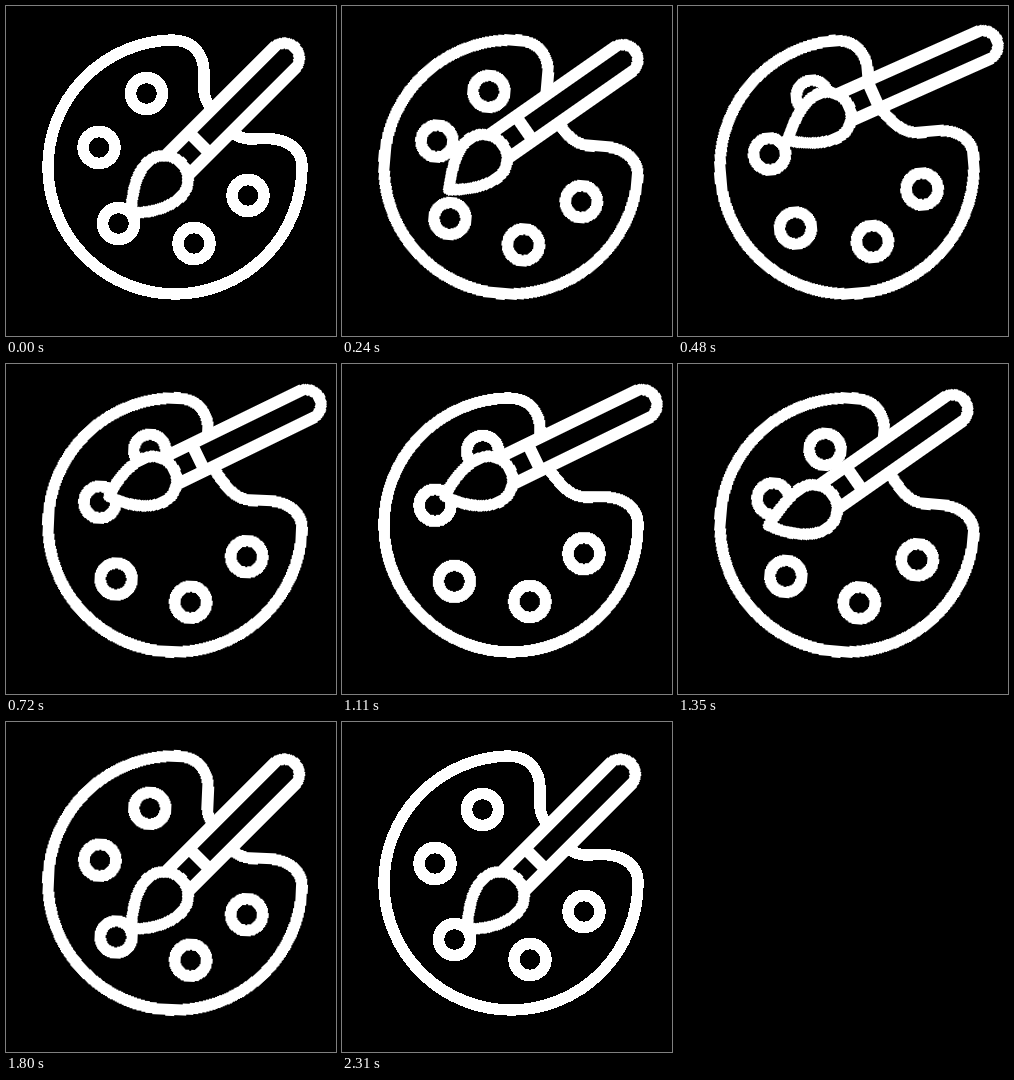
An HTML page without scripts for the animation above (2.46 s loop, 330x330 px).

```html
<!DOCTYPE html>
<html lang="en">
<head>
<meta charset="utf-8">
<title>Palette and brush</title>
<style>
  html, body { margin: 0; width: 100%; height: 100%; overflow: hidden; background: #000; }
  svg { display: block; width: 100vw; height: 100vh; }
  .line { fill: #000; stroke: #fff; stroke-width: 11.5; stroke-linejoin: round; shape-rendering: crispEdges; }

  .palette, .brush, .bristles { animation: 2460ms linear infinite; }
  .palette { transform-origin: 168.5px 161.5px; animation-name: rock; animation-timing-function: ease-in-out; }
  .brush { animation-name: sweep; }
  .bristles { animation-name: bend; animation-timing-function: ease-in-out; }

  @keyframes rock {
    0%, 43.902%, 87.805%, 100% { transform: rotate(0deg); }
    10.976%, 32.927%, 54.878%, 76.829% { transform: rotate(5deg); }
    21.951%, 65.854% { transform: rotate(-6deg); }
  }

  /* Lift off one paint well, cross over, dip into the next, then return */
  @keyframes sweep {
    0%, 65.854%, 100% { transform: translate(156px, 174.5px) rotate(-45deg); }
    2.439% { transform: translate(149px, 167px) rotate(-42.5deg); }
    9.756% { transform: translate(139px, 153px) rotate(-35deg); }
    19.512% { transform: translate(147px, 110px) rotate(-24deg); }
    21.951%, 45.122% { transform: translate(144.5px, 116.5px) rotate(-26deg); }
    46.341% { transform: translate(144px, 113px) rotate(-25.5deg); }
    54.878% { transform: translate(133px, 145px) rotate(-35deg); }
    63.415% { transform: translate(147px, 165px) rotate(-42deg); }
  }

  /* The tip trails behind the handle */
  @keyframes bend {
    0%, 68.293%, 100% { d: path("M26 1C26 14 16 25 2 25C-17 25 -36 11 -44 1C-36 -7 -17 -23 2 -23C16 -23 26 -12 26 1Z"); }
    9.756%, 19.512% { d: path("M26 1C26 14 16 25 2 25C-17 25 -36 13 -44 7C-36 -2 -17 -23 2 -23C16 -23 26 -12 26 1Z"); }
    24.39%, 45.122% { d: path("M26 1C26 14 16 25 2 25C-17 25 -36 8 -44 -4C-36 -11 -17 -23 2 -23C16 -23 26 -12 26 1Z"); }
    54.878%, 63.415% { d: path("M26 1C26 14 16 25 2 25C-17 25 -36 4 -44 -11C-36 -14 -17 -23 2 -23C16 -23 26 -12 26 1Z"); }
  }
</style>
</head>
<body>
<svg viewBox="0 0 330 330" role="img" aria-label="Paint palette with a moving brush">
  <g class="palette line">
    <path d="M166 34C187 34 199 48 198 70C197 88 198 94 209 108C222 126 232 134 248 133C274 130 296 138 296 161A127 127 0 1 1 166 34Z"/>
    <circle cx="140.5" cy="87.5" r="16"/>
    <circle cx="93" cy="141.5" r="16"/>
    <circle cx="112.5" cy="217.5" r="16"/>
    <circle cx="188" cy="237.5" r="16"/>
    <circle cx="242" cy="189.5" r="16"/>
  </g>
  <g class="brush line">
    <path d="M18 -15H173A15 15 0 0 1 173 15H18ZM53 -15V15"/>
    <path class="bristles" d="M26 1C26 14 16 25 2 25C-17 25 -36 11 -44 1C-36 -7 -17 -23 2 -23C16 -23 26 -12 26 1Z"/>
  </g>
</svg>
</body>
</html>
```
